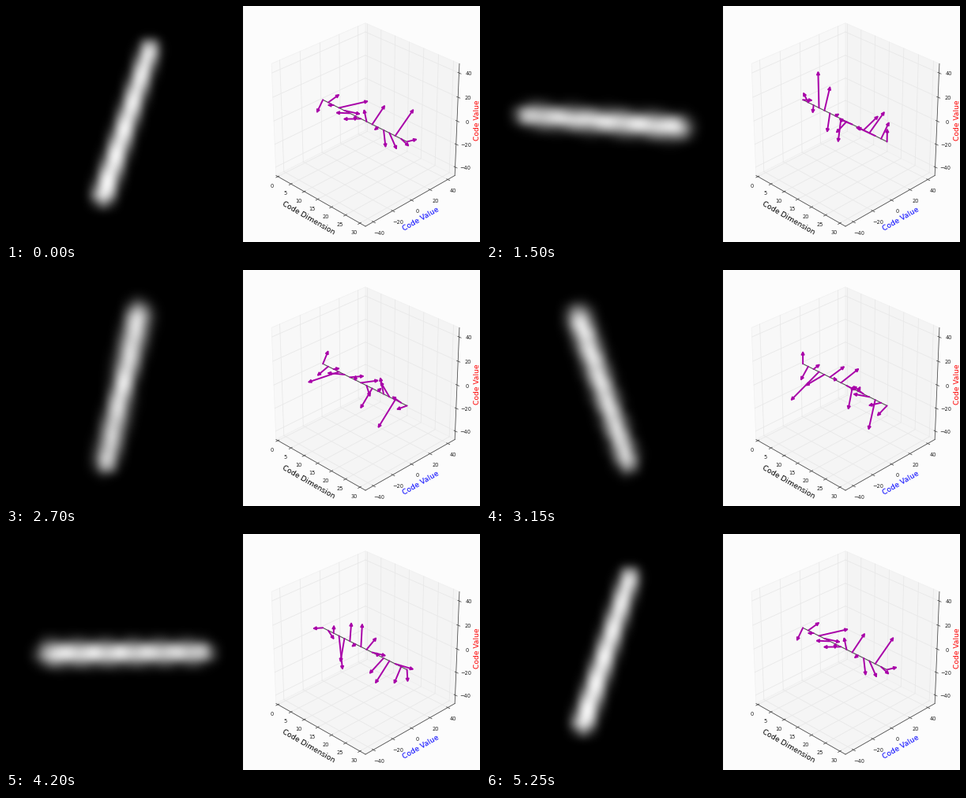
A matplotlib script that plays this animation: 600x300 px, repeating every 5.4 s.

```python
import numpy as np
import matplotlib.pyplot as plt
from matplotlib.animation import FuncAnimation
from matplotlib.patches import FancyArrowPatch, Polygon, Rectangle

W, H, FRAMES = 600, 300, 36
BG, PURPLE, INK = "#fcfcfc", "#a800a8", "#484848"
PT = 0.72  # points per pixel at 100 dpi

plt.rcParams["font.family"] = "DejaVu Sans"
fig = plt.figure(figsize=(W / 100, H / 100), dpi=100, facecolor=BG)
ax = fig.add_axes([0, 0, 1, 1])
ax.set(xlim=(0, W), ylim=(H, 0))
ax.axis("off")


def project(x, y, z):
    """Perspective view of the unit cube, azimuth -45, elevation 30."""
    right, front = (x + y) * np.sqrt(0.5), (x - y) * np.sqrt(0.5)
    near = front * np.sqrt(0.75) + z * 0.5
    up = z * np.sqrt(0.75) - front * 0.5
    k = 1640 / (10 - near)
    return 455 + right * k, 146.2 - up * k


def dim(v):
    return -0.478 + 0.95 * v / 31


def line(a, b, color, width, z):
    (x0, y0), (x1, y1) = project(*a), project(*b)
    ax.plot([x0, x1], [y0, y1], color=color, lw=width * PT, zorder=z)


def label(x, y, s, px, **kw):
    ax.text(x, y, s, fontsize=px * PT, ha="center", va="center", zorder=6, **kw)


def tick_label(point, dx, dy, value):
    x, y = project(*point)
    label(x + dx, y + dy, str(value).replace("-", "\u2212"), 6.6, color="#202020")


# Walls and floor
h = 0.5
back, left = (-h, h), (-h, -h)
front, right = (h, -h), (h, h)
for (a, b), shade in (((left, back), 0.972), ((back, right), 0.955)):
    quad = [(*a, -h), (*b, -h), (*b, h), (*a, h)]
    ax.add_patch(Polygon([project(*p) for p in quad], fc=str(shade), ec="0.94", lw=0.5))
floor = [(*p, -h) for p in (left, front, right, back)]
ax.add_patch(Polygon([project(*p) for p in floor], fc="0.96", ec="0.94", lw=0.5))

# Grid, ticks and tick labels
GRID, OUT, IN = "0.91", h + 0.02, h - 0.012
for v in range(0, 31, 5):
    s = dim(v)
    line((s, -h, -h), (s, h, -h), GRID, 0.8, 2)
    line((s, h, -h), (s, h, h), GRID, 0.8, 2)
    line((s, -OUT, -h), (s, -IN, -h), INK, 0.8, 3)
    tick_label((s, -h, -h), -7.5, 12, v)
for v in range(-40, 41, 20):
    s, t = v / 96, v / 95
    line((-h, s, -h), (h, s, -h), GRID, 0.8, 2)
    line((-h, s, -h), (-h, s, h), GRID, 0.8, 2)
    line((IN, s, -h), (OUT, s, -h), INK, 0.8, 3)
    tick_label((h, s, -h), 7, 14.5, v)
    line((-h, -h, t), (-h, h, t), GRID, 0.8, 2)
    line((-h, h, t), (h, h, t), GRID, 0.8, 2)
    line((IN, h, t), (OUT, h, t), INK, 0.8, 3)
    tick_label((h, h, t), 12.5, 1.3, v)

for a, b in (((*left, -h), (*front, -h)), ((*front, -h), (*right, -h)),
             ((*right, -h), (*right, h))):
    line(a, b, INK, 0.8, 3)
label(382.5, 269.3, "Code Dimension", 9.2, color="black", rotation=-30)
label(525, 270.8, "Code Value", 9.2, color="blue", rotation=30)
label(596.3, 145.6, "Code Value", 9.2, color="red", rotation=90)

# Code vectors: length and starting angle in degrees
CODES = [(11.5, 233), (12.5, 12), (7.3, 158), (32.3, -12), (20, -31), (16.3, 156),
         (4.5, 262), (20, 158), (12.5, 103), (17.7, 40), (4.4, 193), (16.8, 278),
         (20, 294), (24.5, 38), (14, 310), (11.5, 347)]
line((dim(0), 0, 0), (dim(30), 0, 0), "#505050", 1.1, 4)
arrows = []
for _ in CODES:
    arrow = FancyArrowPatch((0, 0), (1, 1), arrowstyle="-|>", mutation_scale=5.5,
                            shrinkA=0, shrinkB=0, lw=1.4, color=PURPLE, zorder=5)
    arrows.append(ax.add_patch(arrow))

# Digit stroke: drawn once on a coarse grid, then turned and smoothed
N = 28
px = (np.arange(N) + 0.5) * 300 / N
gx, gy = np.meshgrid(px - 150, 149 - px)
ax.add_patch(Rectangle((0, 0), 300, 300, fc="black", lw=0))
image = ax.imshow(np.zeros((N, N)), cmap="gray", vmin=0, vmax=1, aspect="auto",
                  extent=(0, 300, 300, 0), interpolation="bicubic", zorder=3)
ax.set(xlim=(0, W), ylim=(H, 0))


def stroke():
    a = np.radians(72.5)
    along = gx * np.cos(a) + gy * np.sin(a) - 2.2
    across = gy * np.cos(a) - gx * np.sin(a) + 2.2
    t = np.clip(along / 97, -1, 1)
    dist = np.hypot(along - 97 * t, across)
    return np.minimum(1, (1.06 - 0.06 * t) * np.exp(-(dist / (12.2 - 0.7 * t)) ** 3))


def turned(img, turn):
    """Rotate the grid counterclockwise with bilinear sampling."""
    c, s = np.cos(turn), np.sin(turn)
    col = np.clip((gx * c + gy * s + 150) * N / 300 - 0.5, 0, N - 1.001)
    row = np.clip((149 + gx * s - gy * c) * N / 300 - 0.5, 0, N - 1.001)
    j, i = col.astype(int), row.astype(int)
    u, v = col - j, row - i
    top = img[i, j] * (1 - u) + img[i, j + 1] * u
    bottom = img[i + 1, j] * (1 - u) + img[i + 1, j + 1] * u
    return top * (1 - v) + bottom * v


DIGIT = stroke()


def draw(i):
    turn = 2 * np.pi * i / (FRAMES - 1)
    image.set_data(turned(DIGIT, turn))
    for n, (arrow, (r, phase)) in enumerate(zip(arrows, CODES)):
        a, s = np.radians(phase) + turn, dim(2 * n)
        tip = project(s, r * np.cos(a) / 95, r * np.sin(a) / 97)
        arrow.set_positions(project(s, 0, 0), tip)
    return [image, *arrows]


anim = FuncAnimation(fig, draw, frames=FRAMES, interval=150, repeat=True, repeat_delay=0)
plt.show()
```
